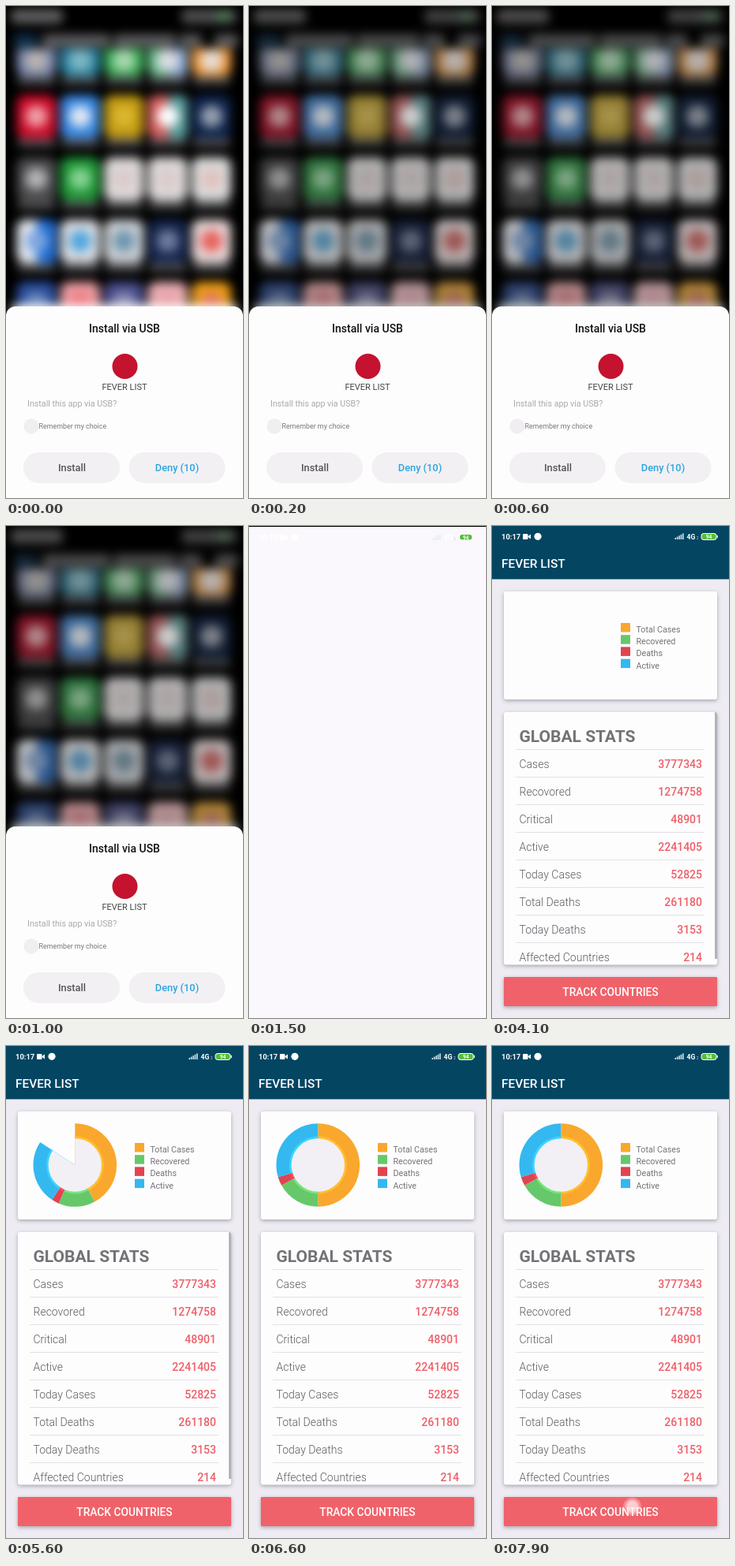
Write an HTML page with a canvas that moves like this. It is 300 px wide and 624 px high and loops after 8000 ms.

```html
<!DOCTYPE html>
<html lang="en">
<head>
<meta charset="utf-8">
<title>Install and dashboard</title>
<style>
html, body { margin: 0; width: 100%; height: 100%; overflow: hidden; background: #000; }
canvas { display: block; width: 300px; height: 624px; }
</style>
</head>
<body>
<canvas id="stage"></canvas>
<script>
const W = 300, H = 624, LOOP = 8000;
const APP = 'FEVER LIST';
const canvas = document.getElementById('stage');
const dpr = window.devicePixelRatio || 1;
canvas.width = W * dpr;
canvas.height = H * dpr;
const ctx = canvas.getContext('2d');
ctx.scale(dpr, dpr);

const CORAL = '#ee5f68';
const SLICES = [
  ['Total Cases', 3777343, '#f9a82d', '#ffc033'],
  ['Recovered', 1274758, '#66c86a', '#75e67a'],
  ['Deaths', 261180, '#e04450', '#ff4e5c'],
  ['Active', 2241405, '#34b8f0', '#3bd3ff']
];
const STATS = [
  ['Cases', '3777343'], ['Recovored', '1274758'], ['Critical', '48901'],
  ['Active', '2241405'], ['Today Cases', '52825'], ['Total Deaths', '261180'],
  ['Today Deaths', '3153'], ['Affected Countries', '214']
];

const ramp = (t, a, b) => Math.min(1, Math.max(0, (t - a) / (b - a)));
const easeInOut = p => (1 - Math.cos(p * Math.PI)) / 2;

function text(str, x, y, size, color, weight = 400, align = 'left') {
  ctx.font = `${weight} ${size}px Roboto, sans-serif`;
  ctx.fillStyle = color;
  ctx.textAlign = align;
  ctx.fillText(str, x, y);
}

function rect(x, y, w, h, color, c = ctx) {
  c.fillStyle = color;
  c.fillRect(x, y, w, h);
}

function round(x, y, w, h, r, color, c = ctx) {
  c.fillStyle = color;
  c.beginPath();
  c.roundRect(x, y, w, h, r);
  c.fill();
}

function disc(x, y, r, color, c = ctx) {
  c.fillStyle = color;
  c.beginPath();
  c.arc(x, y, r, 0, Math.PI * 2);
  c.fill();
}

function layer() {
  const el = document.createElement('canvas');
  el.width = W;
  el.height = H;
  const c = el.getContext('2d');
  rect(0, 0, W, H, '#000', c);
  return c;
}

function filtered(src, filter) {
  const c = layer();
  c.filter = filter;
  c.drawImage(src, 0, 0);
  return c.canvas;
}

// Each tile: base colour, centre colour, optional right-half colour
const TILES = [
  [['#7c88b0', '#b8b4b0'], ['#2c88a8', '#7fb8c4'], ['#3cae58', '#a8d8b0'], ['#6cc08c', '#dcdce4', '#8aa8d0'], ['#ee9a3c', '#e8dcd8']],
  [['#d00c2c', '#f0a0a8'], ['#3a8ae4', '#e0e8f4'], ['#c49c14', '#dcb830'], ['#d86060', '#ffffff', '#5aa0a0'], ['#10264e', '#98a0b0']],
  [['#4c4c4e', '#b4b4b6'], ['#1f9a38', '#88d494'], ['#dedada', '#dccccc'], ['#dedada', '#dccccc'], ['#dcdcdc', '#e0c4c0']],
  [['#e4e8f0', '#80a8e0', '#2070d8'], ['#dcdee2', '#50a8e0'], ['#ccd0d4', '#7098b0'], ['#182850', '#707ca0'], ['#e8d8d8', '#e86460']],
  [['#2c50a0', '#6c88b8'], ['#f0a0a4', '#ec7880'], ['#4c5090', '#9090b4'], ['#ecb0b4', '#e8a0a8'], ['#eea018', '#e0745c']]
];

function makeHome() {
  const c = layer();
  TILES.forEach((row, r) => row.forEach(([base, mid, side], i) => {
    const x = 38.5 + i * 55.4, y = 61 + r * 79;
    round(x - 25, y - 27, 50, 55, 11, base, c);
    if (side) round(x, y - 27, 25, 55, 8, side, c);
    disc(x, y + (r ? 0 : 8), 14, mid, c);
    round(x - 24, y + 28, 48, 11, 4, '#4c4c4e', c);
  }));
  rect(0, 0, W, 54, '#000', c);
  for (const [x, w] of [[46, 86], [136, 80], [220, 28], [264, 30]])
    round(x, 36, w, 16, 5, '#5e5e60', c);
  round(10, 36, 30, 16, 5, '#103450', c);
  round(6, 4, 66, 18, 6, '#606062', c);
  round(222, 4, 70, 18, 6, '#505052', c);
  round(266, 9, 18, 8, 4, '#4c9450', c);
  rect(8, 379, 284, 245, '#fff', c);
  return filtered(c.canvas, 'blur(6.5px)');
}
const home = makeHome();
const dimHome = filtered(home, 'saturate(.68) brightness(.8)');

function drawInstall(t) {
  ctx.drawImage(home, 0, 0, W, H);
  ctx.save();
  ctx.globalAlpha *= ramp(t, 0, 200);
  ctx.drawImage(dimHome, 0, 0, W, H);
  ctx.restore();
  round(0, 381, W, 260, 12, '#fdfdfd');
  text('Install via USB', 150, 413.5, 14, '#111', 500, 'center');
  disc(150.5, 457, 16, '#c4122f');
  text(APP, 150, 487, 11, '#444', 400, 'center');
  text('Install this app via USB?', 27, 508, 10.7, '#a9a9ab');
  disc(32, 533, 9.7, '#f1eef2');
  text('Remember my choice', 41.5, 536, 8.9, '#77777a');
  round(22, 566, 122, 39, 19.5, '#f3f0f4');
  round(155.5, 566, 122, 39, 19.5, '#f3f0f4');
  text('Install', 83.5, 590, 12.8, '#555', 500, 'center');
  text('Deny (10)', 216.5, 590, 12.8, '#2aa5e0', 500, 'center');
}

function drawStatus() {
  text('10:17', 12, 16.5, 9.4, '#fff', 700);
  round(39, 10, 6.5, 7, 1, '#fff');
  ctx.beginPath();
  ctx.moveTo(45, 13.5);
  ctx.lineTo(49, 10.5);
  ctx.lineTo(49, 16.5);
  ctx.fill();
  disc(58, 13.3, 4.6, '#fff');
  for (let i = 0; i < 5; i++) {
    const h = 2 + i * 1.4;
    rect(231.5 + i * 2.4, 17 - h, 1.5, h, '#e4eef2');
  }
  text('4G', 246.5, 16.5, 8.6, '#fff', 700);
  text('2', 259, 17, 4.5, '#bcd0d8');
}

function drawBattery() {
  round(264.5, 9, 20, 9, 4, '#fff');
  rect(284.5, 11.8, 1.3, 3.4, '#fff');
  round(265.5, 10, 18, 7, 3, '#54bd35');
  text('94', 274.5, 16, 6.6, '#fff', 700, 'center');
}

function drawBlank() {
  rect(0, 0, W, H, '#faf8fc');
  drawStatus();
  round(267, 10, 15, 6.2, 2.5, '#54bd35');
  text('94', 274.5, 15.5, 6.4, '#fff', 700, 'center');
}

function card(x, y, w, h, r, color) {
  ctx.save();
  ctx.shadowColor = 'rgba(50,45,65,.38)';
  ctx.shadowBlur = 5 * dpr;
  ctx.shadowOffsetY = 1.8 * dpr;
  round(x, y, w, h, r, color);
  ctx.restore();
}

function wedge(r, from, to, color) {
  ctx.fillStyle = color;
  ctx.beginPath();
  ctx.moveTo(87.3, 151);
  ctx.arc(87.3, 151, r, from, to);
  ctx.fill();
}

function drawChart(reveal) {
  if (reveal <= 0) return;
  const sum = SLICES.reduce((s, d) => s + d[1], 0);
  const top = -Math.PI / 2;
  let a = top;
  for (const [, value, color, light] of SLICES) {
    const b = a + value / sum * Math.PI * 2 * reveal;
    wedge(52.8, a, b, color);
    wedge(36.4, a, b, light);
    a = b;
  }
  wedge(33.7, top, a, '#f2f0f4');
}

function drawStats(t) {
  text('GLOBAL STATS', 34.5, 274, 21, '#747276', 700);
  STATS.forEach(([label, value], i) => {
    const y = 307 + i * 35;
    rect(30, y - 24, 239, 1, '#e2e0e6');
    text(label, 34.5, y, 14, '#5c5a5f', 300);
    text(value, 266, y, 14, CORAL, 500, 'right');
  });
  ctx.globalAlpha *= 1 - ramp(t, 5700, 5950);
  rect(282, 236, 3, 313, '#b4b2b7');
}

function drawTouch(t) {
  const a = ramp(t, 7450, 7600);
  if (!a) return;
  disc(177.5, 584, 11.5, `rgba(255,225,228,${0.3 * a})`);
  disc(177.5, 584, 9.2, `rgba(255,235,236,${0.4 * a})`);
  disc(177.5, 584, 7, `rgba(255,240,240,${0.5 * a})`);
}

function drawDashboard(t) {
  rect(0, 0, W, H, '#eeecf2');
  rect(0, 0, W, 67.5, '#044562');
  drawStatus();
  drawBattery();
  text(APP, 12, 52.5, 15.4, '#fff', 500);

  card(15, 83, 270, 137, 3, '#fefdfe');
  SLICES.forEach(([label, , color], i) => {
    const y = 123 + i * 15.2;
    rect(163, y, 12, 11.5, color);
    text(label, 182.5, y + 12, 10.7, '#747276');
  });
  drawChart(easeInOut(ramp(t, 4120, 6120)));

  card(15, 236, 270, 320.5, 3, '#fefdfe');
  if (t >= 4050) {
    ctx.save();
    ctx.beginPath();
    ctx.roundRect(15, 236, 270, 320.5, 3);
    ctx.clip();
    drawStats(t);
    ctx.restore();
  }

  card(15, 572, 270, 37, 1, '#f0626a');
  text('TRACK COUNTRIES', 150, 596, 13.8, '#fff', 500, 'center');
  drawTouch(t);
}

function draw(t) {
  if (t < 1500) drawInstall(t);
  else rect(0, 0, W, H, '#000');

  if (t >= 1250 && t < 2800) {
    const p = ramp(t, 1250, 1480);
    ctx.save();
    ctx.globalAlpha = ramp(t, 1250, 1420);
    ctx.translate(0, 1 + 60 * Math.pow(1 - p, 3));
    drawBlank();
    ctx.restore();
  }
  if (t >= 2550) {
    ctx.save();
    ctx.globalAlpha = ramp(t, 2550, 2800);
    drawDashboard(t);
    ctx.restore();
  }
}

const start = performance.now();
function frame() {
  draw((performance.now() - start) % LOOP);
  requestAnimationFrame(frame);
}
draw(0);
requestAnimationFrame(frame);
</script>
</body>
</html>
```
